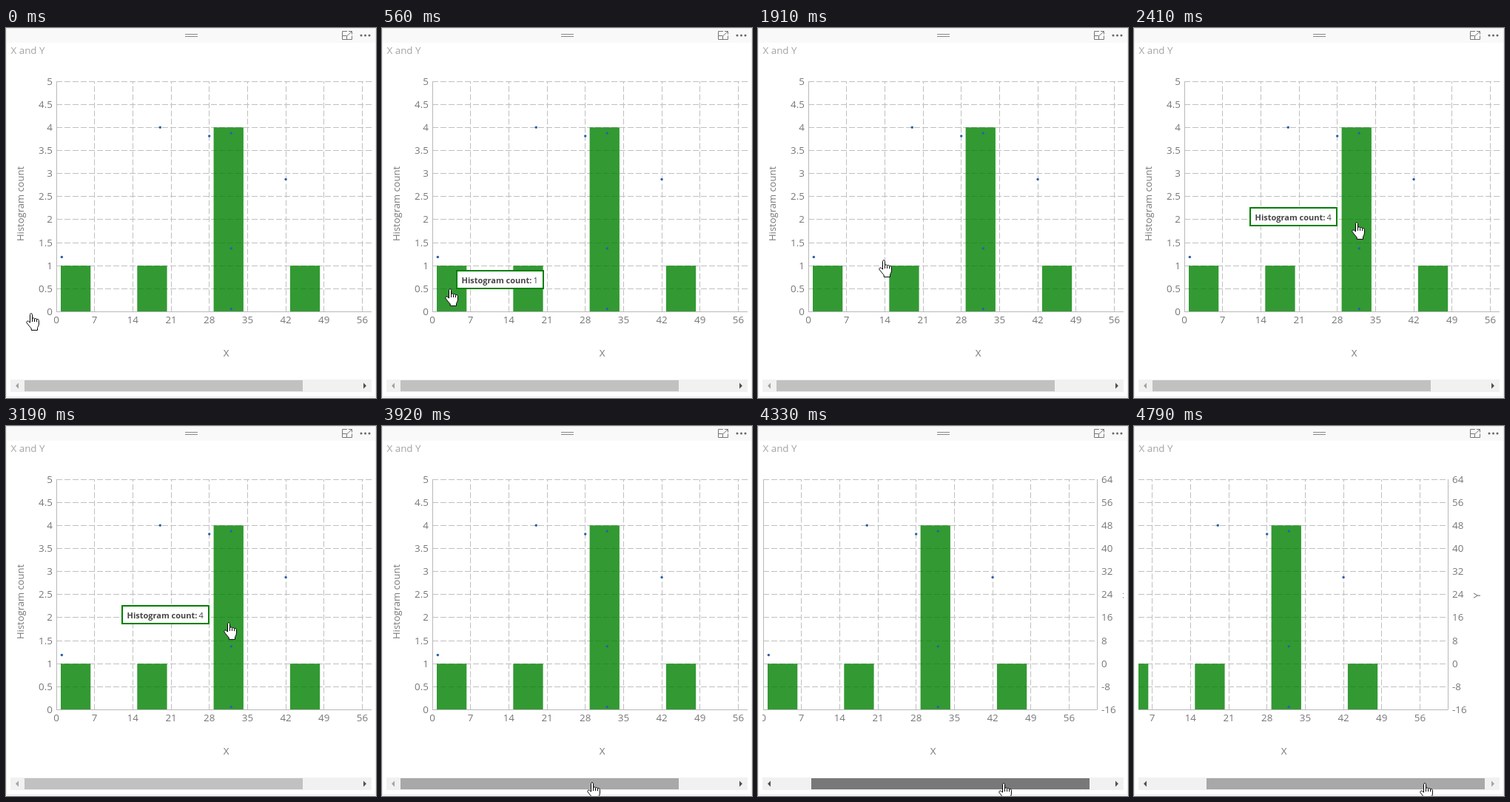
An HTML page for the animation above (5.17 s loop, 500 by 500 pixels).

```html
<!DOCTYPE html>
<html lang="en">
<head>
<meta charset="utf-8">
<title>Histogram with scatter</title>
<style>
  html, body { margin: 0; width: 100%; height: 100%; overflow: hidden; background: #fff; }
  svg { display: block; width: 100vw; height: 100vh; }
  text { font-family: "Open Sans", "Noto Sans", sans-serif; font-size: 13.4px; fill: #777; }
  .grid { stroke: #c0c0c0; stroke-dasharray: 8 3; }
  .axis { stroke: #b8b8b8; }
  .tip rect { fill: #fff; stroke: #008000; stroke-width: 2; }
  .tip text { font-size: 11px; fill: #444; }
  .tip .label { font-weight: bold; }
</style>
</head>
<body>
<svg viewBox="0 0 500 500">
  <defs>
    <clipPath id="view"><rect x="6" y="40" width="488" height="432"/></clipPath>
  </defs>
  <rect width="500" height="500" fill="#fff"/>
  <rect width="500" height="20" fill="#f9f9f9"/>
  <rect x=".5" y=".5" width="499" height="498" fill="none" stroke="#e8e8e8"/>
  <path d="M242 8.5h17M242 11.5h17" stroke="#8a8a8a"/>
  <g fill="none" stroke="#777">
    <path d="M461 4.5h-6.5v11h13v-5M463 4.5h4.5v4M467 5l-6 5.5"/>
    <path d="M454.5 10.5h6v5"/>
  </g>
  <g fill="#666">
    <circle cx="480" cy="10" r="1.5"/><circle cx="485.5" cy="10" r="1.5"/><circle cx="491" cy="10" r="1.5"/>
  </g>
  <text x="6.5" y="35" style="fill:#a3a3a3">X and Y</text>

  <g clip-path="url(#view)"><g id="chart"></g></g>
  <g id="tips"></g>

  <rect x="6" y="475" width="488" height="17" fill="#f1f1f1"/>
  <rect id="thumb" y="476" width="376" height="15"/>
  <path id="leftArrow" d="M17 479.5v8l-4-4z"/>
  <path id="rightArrow" d="M483 479.5v8l4-4z"/>

  <g id="hand" stroke="#000" stroke-linejoin="round">
    <path fill="#fff" d="M5.5 13V2.5C5.5 .2 8.5 .2 8.5 2.5V8C8.5 6.5 11.5 6.5 11.5 8.5C11.5 7 14.5 7.3 14.5 9.2C14.5 8 17.4 8.2 17.4 10.5V15C17.4 18 15.5 19 15.5 20.5V23.4H7.2V21C5.5 19 3.2 16.5 1 13.3C.2 11.4 2.5 10.2 4 11.7Z"/>
    <path fill="none" d="M8.5 8v4M11.5 8.5v3.5M14.5 9.2v3"/>
  </g>
</svg>
<script>
const LOOP = 5170, LEFT = 68, RIGHT = 519, TOP = 72, BOTTOM = 383.5;
const MAX_DRAG = 73, MAX_SCROLL = 95, GRAB_X = 278;
const $ = id => document.getElementById(id);
const px = v => LEFT + v * 7.383;
const py = v => BOTTOM - (v + 16) / 80 * (BOTTOM - TOP);

function add(parent, tag, attrs, content = "") {
  const el = document.createElementNS("http://www.w3.org/2000/svg", tag);
  for (const name in attrs) el.setAttribute(name, attrs[name]);
  el.textContent = content;
  return parent.appendChild(el);
}
const line = (cls, x1, y1, x2, y2) => add($("chart"), "line", { class: cls, x1, y1, x2, y2 });
const label = (x, y, anchor, content) =>
  add($("chart"), "text", { x, y, "text-anchor": anchor }, content);
const crisp = v => Math.floor(v) + 0.5;

function sideLabel(x, y, content) {
  add($("chart"), "text", {
    transform: `translate(${x} ${y}) rotate(-90)`, "text-anchor": "middle", style: "font-size:13px"
  }, content);
}

function buildChart() {
  for (let i = 0; i <= 10; i++) {
    const y = BOTTOM - i * (BOTTOM - TOP) / 10;
    if (i) line("grid", LEFT, crisp(y), RIGHT, crisp(y));
    label(63, y + 4.5, "end", i / 2);
    label(525, y + 4.5, "start", i * 8 - 16);
  }
  for (let v = 0; v <= 56; v += 7) {
    if (v) line("grid", crisp(px(v)), BOTTOM, crisp(px(v)), TOP);
    label(px(v), 399, "middle", v);
  }
  [1, 1, 4, 1].forEach((count, i) => {
    const y = BOTTOM - count * (BOTTOM - TOP) / 5;
    add($("chart"), "rect", {
      x: 74 + i * 103.3, y, width: 40.3, height: BOTTOM - y, fill: "#008000", "fill-opacity": 0.8
    });
  });
  line("axis", LEFT + 0.5, TOP, LEFT + 0.5, BOTTOM);
  line("axis", RIGHT + 0.5, TOP, RIGHT + 0.5, BOTTOM);
  line("axis", LEFT, BOTTOM, RIGHT, BOTTOM);
  for (const [x, y] of [[1, 3], [19, 48], [28, 45], [32, 46], [32, 6], [32, -15], [42, 30]])
    add($("chart"), "circle", { cx: px(x), cy: py(y), r: 1.7, fill: "#2a5fa8" });
  label(297.5, 444, "middle", "X");
  sideLabel(24, 237.5, "Histogram count");
  sideLabel(562.5, 229, "Y");
}

function buildTip(x, y, count) {
  const tip = add($("tips"), "g", { class: "tip", transform: `translate(${x} ${y})` });
  add(tip, "rect", { x: 1, y: 1, width: 117, height: 24 });
  add(tip, "text", { x: 7.5, y: 17.5, class: "label" }, "Histogram count:");
  add(tip, "text", { x: 104.5, y: 17.5 }, count);
  return tip;
}

const easeIn = p => p ** 1.5;
const easeOut = p => 1 - (1 - p) ** 1.5;
const smooth = p => p * p * (3 - 2 * p);
const linear = p => p;

// Pointer path: start, end, steps, target x, target y, easing
const moves = [
  [320, 560, 7, 85, 352, smooth],
  [710, 710, 1, 85, 350, linear],
  [890, 890, 1, 84, 350, linear],
  [1530, 2010, 12, 213, 290, p => p ** 1.7],
  [2060, 2410, 9, 294, 262, easeOut],
  [3190, 3700, 13, 288, 458, smooth],
  [3750, 3920, 5, 277, 481, easeOut],
  [4050, 4240, 6, 307, 482, easeIn],
  [4280, 4650, 9, 386, 482, linear]
];

function pointerAt(t) {
  let x = 27, y = 385;
  for (const [start, end, steps, toX, toY, ease] of moves) {
    if (t < start) break;
    const gap = (end - start) / (steps - 1) || 1;
    const done = Math.min(steps, Math.floor((t - start) / gap + 0.001) + 1);
    const p = ease(done / steps);
    x += (toX - x) * p;
    y += (toY - y) * p;
  }
  return { x: Math.round(x), y: Math.round(y) };
}

buildChart();
const lowTip = buildTip(100, 327, 1);
const highTip = buildTip(156, 242, 4);
const show = (el, on) => el.setAttribute("visibility", on ? "visible" : "hidden");

function draw(t) {
  const { x, y } = pointerAt(t);
  const tipX = x + 7;
  const over = (left, top) => tipX >= left && tipX <= left + 40 && y >= top && y <= BOTTOM;
  const drag = t < 4050 ? 0 : Math.max(0, Math.min(MAX_DRAG, x - GRAB_X));
  const pressed = t >= 4050 && t < 4790;

  show(lowTip, over(74, 321));
  show(highTip, over(280.6, 134));
  $("hand").setAttribute("transform", `translate(${x} ${y})`);
  $("chart").setAttribute("transform", `translate(${-Math.round(drag * MAX_SCROLL / MAX_DRAG)} 0)`);
  $("thumb").setAttribute("x", 25 + drag);
  $("thumb").setAttribute("fill", pressed ? "#787878" : y >= 474 ? "#a8a8a8" : "#c1c1c1");
  $("leftArrow").setAttribute("fill", drag > 0 ? "#505050" : "#a3a3a3");
  $("rightArrow").setAttribute("fill", drag < MAX_DRAG ? "#505050" : "#a3a3a3");
}

const began = performance.now();
function tick() {
  draw((performance.now() - began) % LOOP);
  requestAnimationFrame(tick);
}
tick();
</script>
</body>
</html>
```
